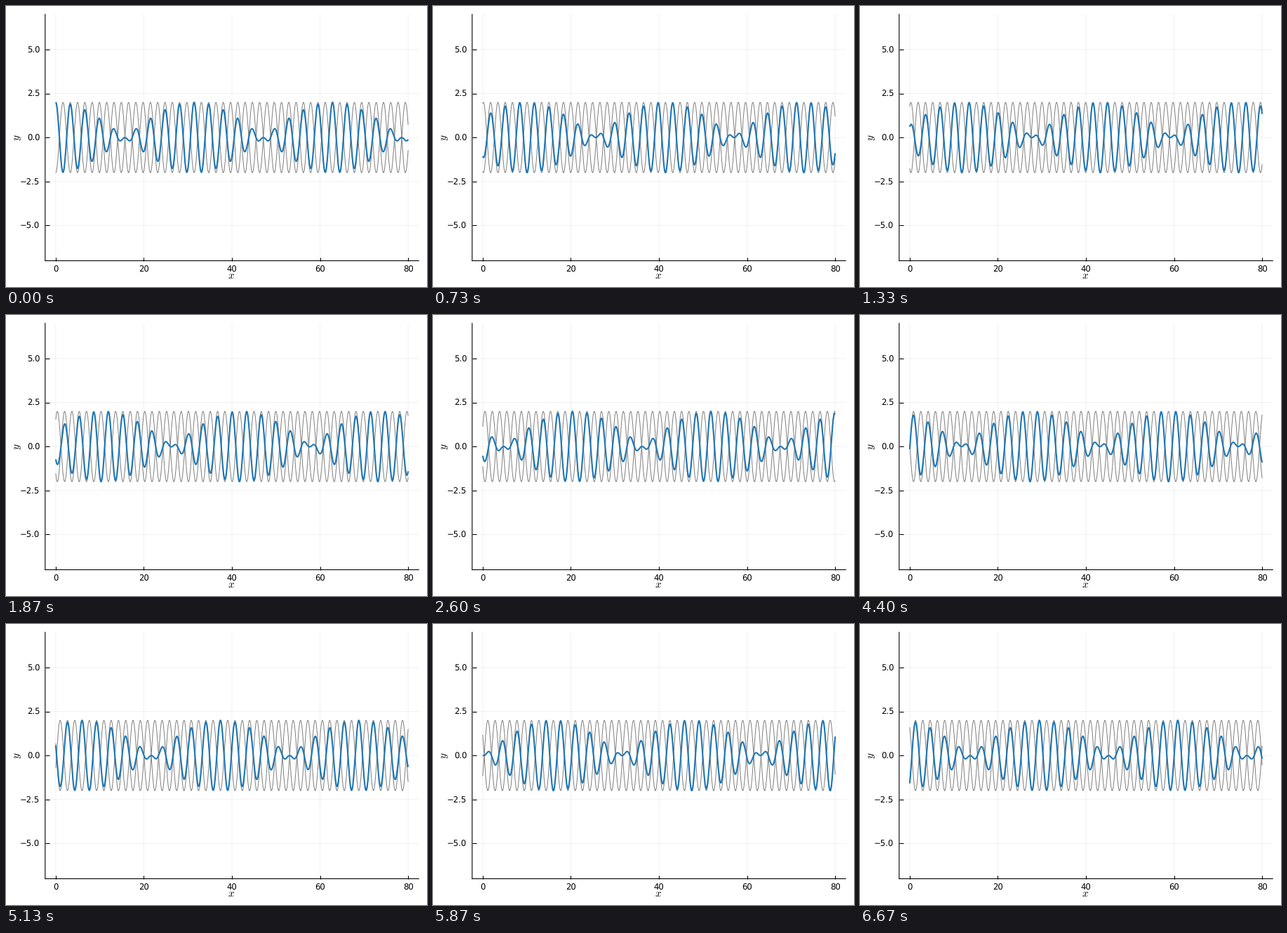
Recreate the animation shown at these times as a matplotlib script. Size 600 px wide and 400 px high, loop 6740 ms.

```python
import numpy as np
import matplotlib.pyplot as plt
from matplotlib.animation import FuncAnimation

W, H, DPI = 600, 400, 100
LEFT, RIGHT, TOP, BOTTOM = 55.8, 588.2, 11.8, 362.6

# The wave advances 15 times a second; drawing ticks are finer than that
TICK_MS, LOOP_MS = 20, 6740
RATE, LAST_STEP = 15, 100

# Two travelling waves: wave numbers and phase advance per step
K1, K2 = 2.0, 1.8
W1, W2 = 0.4, -0.35

plt.rcParams.update({
    "font.family": "DejaVu Sans",
    "mathtext.fontset": "cm",
    "text.hinting": "no_hinting",
    "lines.solid_joinstyle": "round",
    "lines.solid_capstyle": "butt",
})


def pt(px):
    return px * 72 / DPI


fig = plt.figure(figsize=(W / DPI, H / DPI), dpi=DPI, facecolor="white")
ax = fig.add_axes([LEFT / W, 1 - BOTTOM / H,
                   (RIGHT - LEFT) / W, (BOTTOM - TOP) / H])
ax.set_xlim(-2.4, 82.4)
ax.set_ylim(-7, 7)
ax.set_xticks(range(0, 81, 20))
ax.set_yticks(np.arange(-5, 5.1, 2.5))
ax.set_axisbelow(True)
ax.grid(color="black", alpha=0.055, linewidth=pt(1), snap=False)
ax.tick_params(direction="in", length=pt(5.5), width=pt(1.1), labelsize=8.4)
ax.tick_params(axis="x", pad=pt(7))
ax.tick_params(axis="y", pad=pt(7.5))
for side in ("top", "right"):
    ax.spines[side].set_visible(False)
for side in ("left", "bottom"):
    ax.spines[side].set(linewidth=pt(1.1), snap=False)
for line in ax.get_xticklines() + ax.get_yticklines():
    line.set_snap(False)

fig.text(321.5 / W, 1 - 388 / H, "$x$", size=11, ha="center", va="baseline")
fig.text(18.7 / W, 1 - 187 / H, "$y$", size=11, ha="center", va="baseline",
         rotation=90, rotation_mode="anchor")

x = np.linspace(0, 80, 1001)
upper, = ax.plot(x, x * 0, color="gray", lw=pt(1))
lower, = ax.plot(x, x * 0, color="gray", lw=pt(1))
beat, = ax.plot(x, x * 0, color="#1f77b4", lw=pt(2.1))


def update(tick):
    # a tick belongs to the step reached by its end
    n = min((tick + 1) * TICK_MS * RATE // 1000, LAST_STEP)
    a = K1 * x - W1 * n
    b = K2 * x - W2 * n
    carrier = 2 * np.cos((a + b) / 2)
    upper.set_ydata(carrier)
    lower.set_ydata(-carrier)
    beat.set_ydata(np.cos(a) + np.cos(b))
    return upper, lower, beat


anim = FuncAnimation(fig, update, frames=LOOP_MS // TICK_MS, interval=TICK_MS,
                     init_func=lambda: update(0), repeat=True, repeat_delay=0)
plt.show()
```
